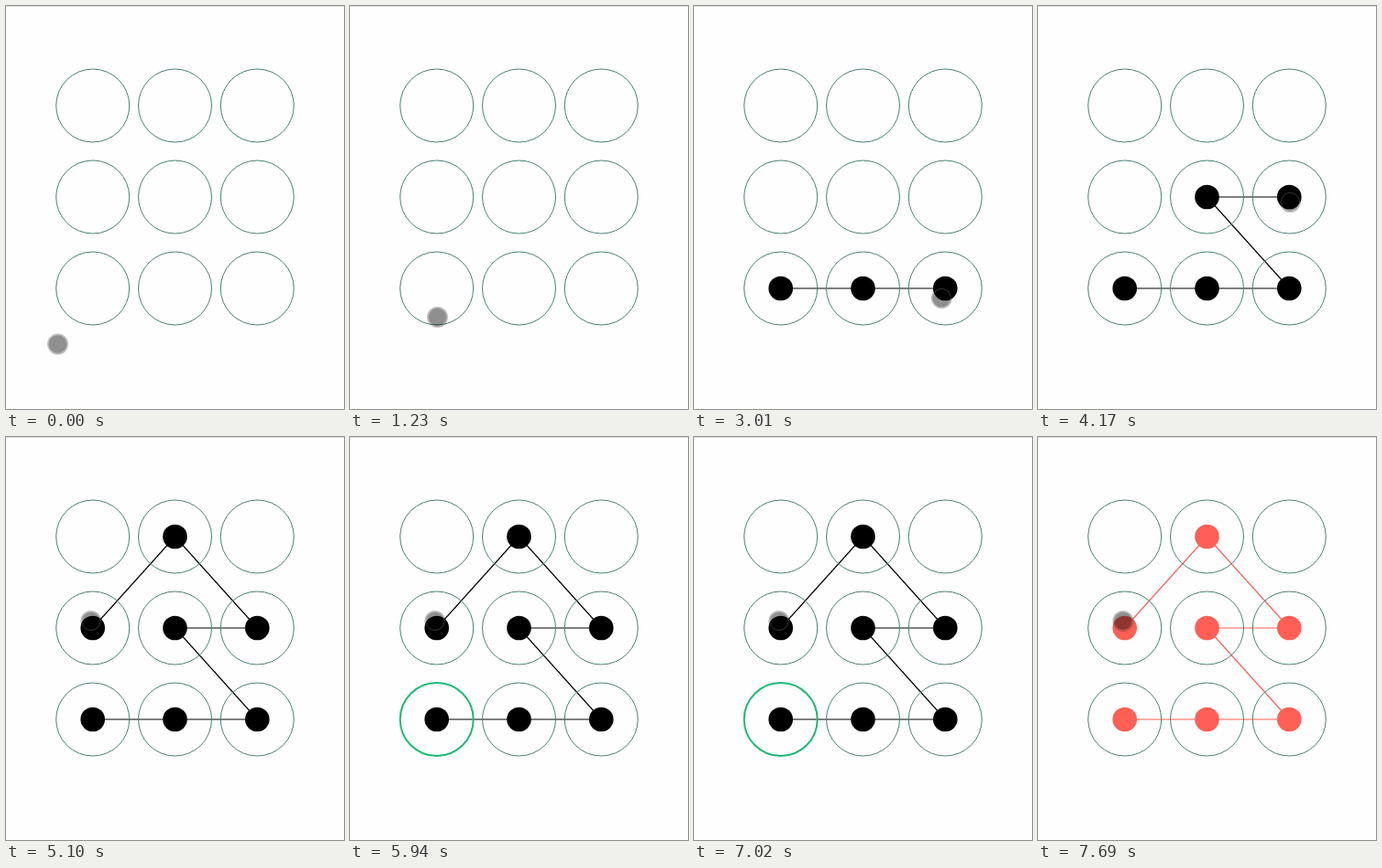
Recreate the animation shown at these times as an HTML page. Size 369x441 px, loop 8000 ms.

```html
<!DOCTYPE html>
<html lang="en">
<head>
<meta charset="utf-8">
<title>Pattern lock</title>
<style>
html, body { margin: 0; width: 100%; height: 100%; overflow: hidden; background: #fefefe; }
svg { display: block; color: #000; }
svg.wrong { color: #ff5f54; }
.ring { fill: none; stroke: #468375; stroke-width: 1; }
.ring.lit { stroke: #1dbb75; stroke-width: 2; }
.dot { fill: currentColor; }
.line { stroke: currentColor; stroke-width: 1.15; }
</style>
</head>
<body>
<svg id="stage" width="369" height="441" viewBox="0 0 369 441">
  <rect width="369" height="1" fill="#dcdcdc"/>
  <g id="lines"></g>
  <g id="rings"></g>
  <g id="dots"></g>
  <g id="pointer">
    <circle r="11.5" fill="#000" fill-opacity=".24"/>
    <circle r="9.7" fill="#000" fill-opacity=".26"/>
    <circle r="10.2" fill="none" stroke="#999" stroke-opacity=".35"/>
  </g>
</svg>
<script>
// The picture advances in even steps; every moment below is a step number.
const LOOP = 8000, FIRST = 246, STEP = 137.5;
const PRESS = 17, RELEASE = 35, PLAY = 41, CLEAR = 48, REPLAY = 49, WRONG = 54;
const RADIUS = 40;

// Key points of the pointer: step, x, y.
const path = [
  [0, 56.5, 370], [1, 70.3, 359], [6, 70, 358],
  [7, 95.5, 340.5], [9, 96.5, 320.5], [16, 91.5, 319.5],
  [20, 270.3, 319.6], [21, 270.3, 319.6],
  [23, 195.5, 227], [24, 191.6, 218], [26, 191.6, 218],
  [28, 275.3, 214.5], [29, 275, 207],
  [31, 200, 142], [32, 199.5, 131.5], [RELEASE, 92.8, 201.4]
];

const get = id => document.getElementById(id);
const stage = get('stage'), pointer = get('pointer');

function add(parent, tag, attrs) {
  const el = document.createElementNS('http://www.w3.org/2000/svg', tag);
  for (const key in attrs) el.setAttribute(key, attrs[key]);
  return get(parent).appendChild(el);
}

function pointerAt(step) {
  const next = path.findIndex(p => p[0] > step);
  if (next < 1) return path.at(next).slice(1);
  const [s0, x0, y0] = path[next - 1], [s1, x1, y1] = path[next];
  const u = (step - s0) / (s1 - s0), ease = u * u * (3 - 2 * u);
  return [x0 + (x1 - x0) * ease, y0 + (y1 - y0) * ease];
}

const cells = Array.from({ length: 9 }, (_, i) => {
  const x = 94.7 + 89.8 * (i % 3), y = 109 + 100 * Math.floor(i / 3);
  return { x, y, ring: add('rings', 'circle', { class: 'ring', cx: x, cy: y, r: RADIUS }) };
});

// While pressed, the pointer picks each cell it enters.
const picked = [];
for (let step = PRESS; step <= RELEASE; step++) {
  const [px, py] = pointerAt(step);
  for (const cell of cells) {
    const { x, y } = cell;
    if (picked.includes(cell) || Math.hypot(px - x, py - y) > RADIUS) continue;
    const last = picked.at(-1);
    cell.since = step;
    cell.marks = [add('dots', 'circle', { class: 'dot', cx: x, cy: y, r: 13.3 })];
    if (last) cell.marks.push(add('lines', 'line', { class: 'line', x1: last.x, y1: last.y, x2: x, y2: y }));
    picked.push(cell);
  }
}

function isLit(i, step) {
  if (step < CLEAR) return step >= PLAY + i;
  return step < WRONG && step >= REPLAY + 1.3 * i;
}

function render(t) {
  // Before the first step the pointer rests at its start.
  const step = Math.max(0, Math.floor((t - FIRST) / STEP));
  picked.forEach((cell, i) => {
    const visibility = step >= cell.since ? 'visible' : 'hidden';
    cell.marks.forEach(mark => mark.setAttribute('visibility', visibility));
    cell.ring.classList.toggle('lit', isLit(i, step));
  });
  stage.classList.toggle('wrong', step >= WRONG);
  pointer.setAttribute('transform', `translate(${pointerAt(step)})`);
}

const start = performance.now();
function tick() {
  render((performance.now() - start) % LOOP);
  requestAnimationFrame(tick);
}
tick();
</script>
</body>
</html>
```
